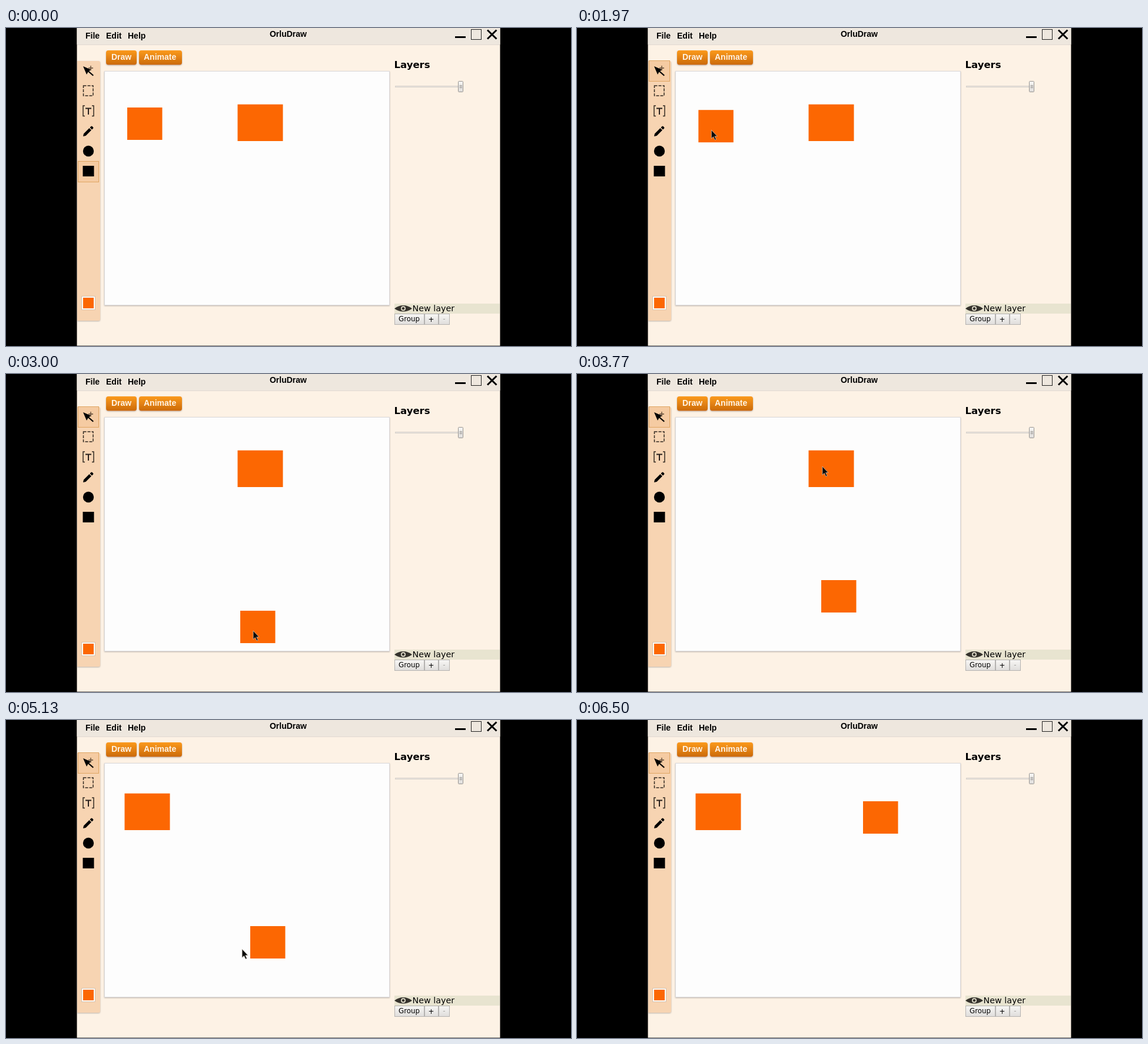
These frames come from a looping animation (960x540 px, 7.56 s). An HTML page:

```html
<!DOCTYPE html>
<html lang="en">
<head>
<meta charset="utf-8">
<title>Drawing tool</title>
<style>
  html, body { margin: 0; width: 100%; height: 100%; overflow: hidden; background: #000; }
  svg { display: block; width: 960px; height: 540px; }
  .ui { font: bold 14px "Liberation Sans", Arial, sans-serif; }
  .dv { font-family: "DejaVu Sans", sans-serif; }
  .shape { fill: #fc6702; }
  .pick { fill: #f5cba2; stroke: #dfa562; }
  .btn { fill: url(#grey); stroke: #b4b2b0; }
</style>
</head>
<body>
<svg viewBox="0 0 960 540">
  <defs>
    <linearGradient id="amber" x2="0" y2="1">
      <stop offset="0" stop-color="#fb9a1c"/>
      <stop offset="1" stop-color="#cb6a0c"/>
    </linearGradient>
    <linearGradient id="grey" x2="0" y2="1">
      <stop offset="0" stop-color="#f8f7f5"/>
      <stop offset="1" stop-color="#dfdddb"/>
    </linearGradient>
    <filter id="soft" x="-20%" y="-20%" width="140%" height="140%">
      <feDropShadow dx="0" dy="1" stdDeviation="1.2" flood-color="#77706c" flood-opacity=".5"/>
    </filter>
    <clipPath id="page"><rect x="168" y="74" width="483" height="396"/></clipPath>
  </defs>

  <!-- window -->
  <rect x="120.5" width="719" height="539.5" fill="#fdf2e5"/>
  <rect x="120.5" width="719" height="28" fill="#eee7de"/>
  <path d="M121 28.5H839" stroke="#e2dad2"/>
  <g class="ui">
    <text x="135" y="18">File</text>
    <text x="170" y="18">Edit</text>
    <text x="207" y="18">Help</text>
    <text x="479.5" y="15" text-anchor="middle">OrluDraw</text>
  </g>
  <path d="M763 15.5H781" stroke="#000" stroke-width="3"/>
  <rect x="790.5" y="2.5" width="17" height="17" fill="none" stroke="#222"/>
  <path d="M818 3.5L833.5 18.5M833.5 3.5L818 18.5" stroke="#000" stroke-width="3"/>

  <!-- mode buttons -->
  <g class="ui" fill="#fff3e2">
    <rect x="170" y="38" width="52" height="24.5" rx="4" fill="url(#amber)" filter="url(#soft)"/>
    <rect x="226" y="38" width="73" height="24.5" rx="4" fill="url(#amber)" filter="url(#soft)"/>
    <text x="179" y="54">Draw</text>
    <text x="234" y="54">Animate</text>
  </g>

  <!-- tools -->
  <path d="M121 56H157Q160 56 160 59V494Q160 497 157 497H121Z" fill="#f7d4b2" filter="url(#soft)"/>
  <rect id="pickBox" class="pick" x="122.5" y="226.5" width="35" height="35"/>
  <rect id="pickArrow" class="pick" x="122.5" y="55.5" width="35" height="35"/>
  <path d="M131 65L145 71L141 73L149 80L147.5 81.5L139.5 74.5L137 79Z"/>
  <path d="M140 68H148M144 64V72" stroke="#5a4634" stroke-width="1.3"/>
  <rect x="131.5" y="98" width="16.5" height="17" fill="none" stroke="#332a22" stroke-width="1.5" stroke-dasharray="5 2"/>
  <path d="M134 132H131V149.5H134M146 132H149V149.5H146" fill="none" stroke="#332a22" stroke-width="1.5"/>
  <path d="M135 136.5H145M140 136.5V147" stroke="#28211c" stroke-width="2"/>
  <path d="M131 184L132 179.5L141.5 170L145 173.5L135.5 183Z M142.5 169L144.5 167Q145.5 166 146.5 167L148 168.5Q149 169.5 148 170.5L146 172.5Z"/>
  <circle cx="140" cy="209" r="9.2"/>
  <rect x="130.5" y="234" width="19" height="18"/>
  <rect x="128.5" y="455.5" width="23" height="23" fill="#fdfaf6" stroke="#d8c3ae"/>
  <rect class="shape" x="131" y="458" width="18" height="18"/>

  <!-- drawing area -->
  <rect x="167.5" y="73.5" width="484" height="397" fill="#fdfdfd" stroke="#dbdadd" filter="url(#soft)"/>
  <g clip-path="url(#page)">
    <rect id="small" class="shape" x="206" y="135" width="59.5" height="55"/>
    <rect id="large" class="shape" x="393.5" y="129.7" width="77" height="62.3"/>
  </g>

  <!-- layers -->
  <g class="dv">
    <text x="659.5" y="68" font-size="16.5" font-weight="bold">Layers</text>
    <rect x="661.5" y="98.5" width="112" height="2" fill="#ece6df" stroke="#d6d1cb"/>
    <rect x="768.5" y="90.5" width="8" height="18" rx="1" fill="url(#grey)" stroke="#96938f"/>
    <path d="M770.5 97.5H775M770.5 99.5H775M770.5 101.5H775" stroke="#96938f"/>
    <rect x="660" y="468" width="179" height="17" fill="#e8e4d0"/>
    <path d="M660 476.5Q667 471 675 471T690 476.5Q683 481.5 675 481.5T660 476.5Z" fill="#35322c"/>
    <circle cx="675" cy="476.3" r="4" fill="#e4e0ce"/>
    <circle cx="675" cy="476.3" r="2.3" fill="#35322c"/>
    <text x="690.5" y="481" font-size="14.3">New layer</text>
    <rect class="btn" x="660.5" y="485.5" width="50" height="18"/>
    <rect class="btn" x="711.5" y="485.5" width="23" height="18"/>
    <rect class="btn" x="735.5" y="485.5" width="18" height="18"/>
    <g font-size="11.8" text-anchor="middle">
      <text x="685" y="498">Group</text>
      <text x="722.5" y="498.5">+</text>
      <text x="744.5" y="498" fill="#a5a29e">-</text>
    </g>
  </g>

  <path id="mouse" d="M0 0V14.5L3.3 11.5L6 17L8.2 16L5.7 10.7H10Z" fill="#0a0a08" stroke="#d8d0c6" stroke-width=".7"/>
</svg>
<script>
const LOOP = 7560;
const $ = id => document.getElementById(id);
const mouse = $("mouse"), small = $("small"), large = $("large");

// time, x, y of the pointer tip
const path = [
  [30, 842, 528], [130, 728, 486], [300, 728, 486], [770, 166, 95],
  [930, 166, 95], [1230, 159, 71], [1430, 140, 73], [1600, 140, 73],
  [1950, 228, 169], [2330, 234, 245], [2530, 253, 245], [3000, 420, 436],
  [3130, 424, 437], [3300, 437, 384], [3770, 417, 157], [3870, 410, 148],
  [4330, 271, 216], [4680, 218, 143], [4750, 218, 143], [5130, 401, 389],
  [5350, 426, 380], [5430, 426, 380], [6170, 497, 168], [6200, 497, 168],
  [6500, 741, 305]
];

function tip(t) {
  const i = path.findIndex(p => p[0] >= t);
  if (i < 1) return path[i ? path.length - 1 : 0].slice(1);
  const [t0, x0, y0] = path[i - 1], [t1, x1, y1] = path[i];
  const k = (t - t0) / (t1 - t0);
  return [x0 + (x1 - x0) * k, y0 + (y1 - y0) * k];
}

// how far a drag between two times has carried its shape
function drag(t, from, to) {
  const a = tip(from), b = tip(Math.min(to, Math.max(from, t)));
  return [b[0] - a[0], b[1] - a[1]];
}

const move = (el, x, y) =>
  el.setAttribute("transform", `translate(${x.toFixed(2)} ${y.toFixed(2)})`);
const show = (el, on) => el.setAttribute("visibility", on ? "visible" : "hidden");

function draw(t) {
  const a = drag(t, 1950, 3300), b = drag(t, 5430, 6170);
  move(small, a[0] + b[0], a[1] + b[1]);
  move(large, ...drag(t, 3870, 4680));
  move(mouse, ...tip(t));
  show(mouse, t >= 30 && t < 6500);
  show($("pickBox"), t < 1600);
  show($("pickArrow"), t >= 1330);
}

const start = performance.now();
function tick(now) {
  draw(Math.max(0, now - start) % LOOP);
  requestAnimationFrame(tick);
}
draw(0);
requestAnimationFrame(tick);
</script>
</body>
</html>
```
